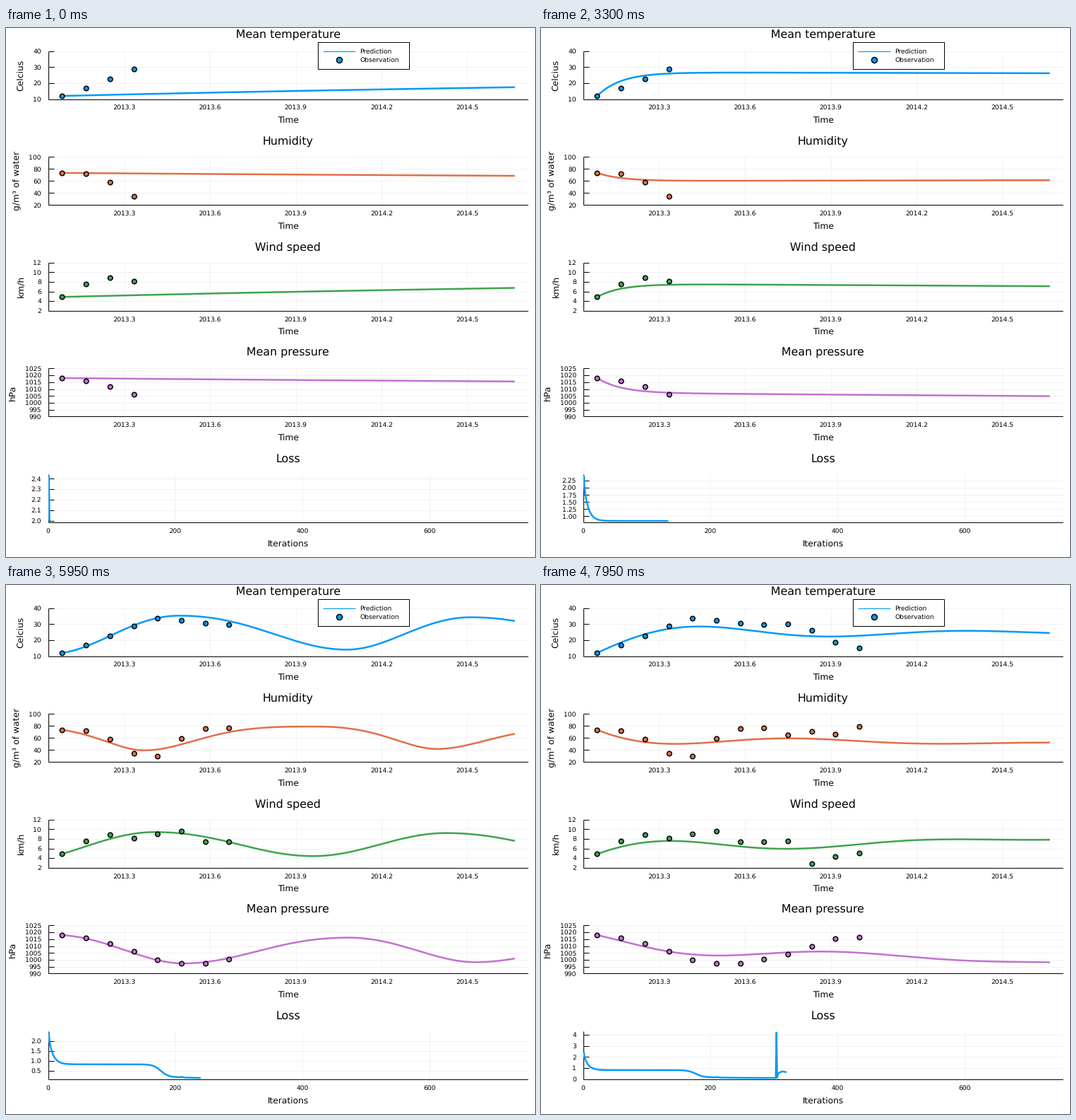
Write a matplotlib script that moves like this. It is 748x748 px and loops after 8000 ms.

```python
import numpy as np
import matplotlib.pyplot as plt
from matplotlib.animation import FuncAnimation
from matplotlib.collections import LineCollection
from matplotlib.patches import Rectangle

SIZE, DPI, FRAMES, STEP_MS = 748, 100, 160, 50
PT = 72 / DPI
LEFT, RIGHT, HEIGHT = 59.7, 738.3, 68
MID = 398.9
GRID, BLUE = "#f0f0f0", "#009afa"
T0, SPAN = 2013.0836, 1.5826
YEAR = 1.021                      # period of the fitted oscillation
STAGE2, SWING, STAGE3 = 75, 98, 151
T = np.linspace(0, SPAN, 241)

plt.rcParams["font.family"] = "DejaVu Sans"
plt.rcParams["text.hinting"] = "none"

fig = plt.figure(figsize=(SIZE / DPI, SIZE / DPI), dpi=DPI, facecolor="white")
ax = fig.add_axes([0, 0, 1, 1])
ax.set_xlim(0, SIZE)
ax.set_ylim(SIZE, 0)
ax.axis("off")


def text(x, y, s, px, ha="center", **kw):
    return ax.text(x, y, s, fontsize=px * PT, ha=ha, va="baseline", **kw)


def lines(segments, color, width, z):
    col = LineCollection(segments, colors=color, linewidths=width * PT, zorder=z)
    ax.add_collection(col)
    return col


def dots(color, px, z=7):
    return ax.plot([], [], "o", color=color, ms=px * PT, mec="black",
                   mew=1.5 * PT, zorder=z)[0]


def time_x(t):
    return 167 + (np.asarray(t) - 2013.3) * 404.4


def iter_x(n):
    return LEFT + np.asarray(n) * 0.8987


class Panel:
    def __init__(self, row, title, xlabel, xticks, xlabels):
        self.bottom = b = 100.6 + 149.6 * row
        self.top = b - HEIGHT
        text(MID, b - 85.5, title, 15.9)
        text(MID, b + 33.5, xlabel, 12.3)
        for x, s in zip(xticks, xlabels):
            text(x, b + 14.6, s, 9.1)
        lines([[(x, self.top), (x, b)] for x in xticks], GRID, 0.9, 1)
        lines([[(LEFT, self.top), (LEFT, b)], [(LEFT, b), (RIGHT, b)]], "black", 1, 5)
        self.grid = lines([], GRID, 0.9, 1)
        self.ticks = lines([], "black", 1, 5)
        self.labels = [text(49.9, 0, "", 9.1, ha="right") for _ in range(9)]

    def y(self, v, lo, hi):
        return self.bottom - (np.asarray(v, float) - lo) / (hi - lo) * HEIGHT

    def set_ticks(self, values, lo, hi, fmt):
        ys = self.y(values, lo, hi)
        self.grid.set_segments([[(LEFT, y), (RIGHT, y)] for y in ys])
        self.ticks.set_segments([[(LEFT, y), (LEFT + 8, y)] for y in ys])
        for lab in self.labels:
            lab.set_text("")
        for lab, v, y in zip(self.labels, values, ys):
            lab.set_text(fmt % v)
            lab.set_y(y + 3.2)

    def curve(self, color):
        line, = ax.plot([], [], color=color, lw=2.5 * PT, zorder=6,
                        solid_capstyle="butt", solid_joinstyle="round")
        line.set_clip_path(Rectangle((LEFT, self.top), RIGHT - LEFT, HEIGHT,
                                     transform=ax.transData))
        return line


def cycle(t, turn, part, lean_out, lean_back):
    """Skewed cosine: 1 at turn, -1 after the given part of the period."""
    u = (t - turn) / YEAR % 1
    out = u < part
    s = np.where(out, u / part, (u - part) / (1 - part))
    s = s + np.where(out, lean_out, lean_back) * s * (1 - s)
    return np.where(out, 1, -1) * np.cos(np.pi * s)


class Series:
    def __init__(self, row, title, ylabel, base, color, axis, obs, settle, orbit, damped):
        self.panel = Panel(row, title, "Time", time_x(2013.3 + 0.3 * np.arange(5)),
                           ["%.1f" % (2013.3 + 0.3 * i) for i in range(5)])
        lo, hi, step = axis
        self.range = lo, hi
        self.panel.set_ticks(np.arange(lo, hi + 1, step), lo, hi, "%d")
        text(base, self.panel.bottom - HEIGHT / 2, ylabel, 12.4,
             rotation=90, rotation_mode="anchor")
        self.start = obs[0]
        self.obs_x = time_x(T0 + np.arange(len(obs)) / 12)
        self.obs_y = self.panel.y(obs, lo, hi)
        self.settle_args, self.orbit_args, self.damped_args = settle, orbit, damped
        self.line = self.panel.curve(color)
        self.dots = dots(color, 6.6)

    def anchored(self, v):
        return v + (self.start - v[0]) * np.exp(-T / 0.15)

    def settle(self, k):
        """Relax towards a level, faster as training goes on."""
        first, last, drift = self.settle_args
        grown = 1 - np.exp(-k / 6)
        amp = first + (last - first) * grown
        rate = 0.29 + 11.7 * grown
        return self.start + amp * (1 - np.exp(-rate * T)) + drift * min(k / 66, 1) * T

    def orbit(self, k):
        mean, amp, lift, turn, *shape = self.orbit_args
        fade = np.exp(-max(k - SWING, 0) / 18)
        t = T - 0.02 * fade * np.cos(2 * np.pi * (T - turn) / YEAR)
        wave = amp * np.exp(-0.1 * T) * cycle(t, turn, *shape)
        return self.anchored(mean + lift * fade + wave)

    def damped(self):
        mean, slope, amp, turn = self.damped_args
        wave = amp * np.exp(-1.4 * T) * np.cos(2 * np.pi * (T - turn) / 0.95)
        return self.anchored(mean + slope * T + wave)

    def predict(self, k):
        swing = self.orbit(k)
        if k < SWING:
            mix = 1 / (1 + np.exp((86 - k) / 1.8)) + 0.2 * np.exp(-((k - 92) / 2.5)**2)
            flat = self.settle(k)
            return flat + mix * (swing - flat)
        if k < STAGE3:
            return swing
        if k == STAGE3:
            return swing + self.orbit_args[1] * 1.2 * T
        mix = min(1, 0.25 + (k - STAGE3 - 1) / 8)
        return swing + mix * (self.damped() - swing)

    def update(self, k):
        self.line.set_data(time_x(T0 + T), self.panel.y(self.predict(k), *self.range))
        n = 4 if k < STAGE2 else 8 if k < STAGE3 else 12
        self.dots.set_data(self.obs_x[:n], self.obs_y[:n])


# settle: first and last amplitude, drift
# orbit: mean, amplitude, lift, turn, part, leans; damped: mean, slope, amplitude, turn
series = [
    Series(0, "Mean temperature", "Celcius", 24.3, BLUE, (10, 40, 10),
           [12, 16.8, 22.8, 28.8, 33.8, 32.5, 30.6, 29.5, 29.9, 26.1, 18.8, 15.1],
           settle=(14.8, 14.8, -0.4),
           orbit=(23.85, 11.4, 1.7, 0.405, 0.585, -0.2, 0.1),
           damped=(24.6, 0, 7.5, 0.37)),
    Series(1, "Humidity", "g/m³ of water", 19, "#e36f47", (20, 100, 20),
           [73.3, 72.4, 58, 34.9, 29.2, 59.3, 75.3, 77.1, 64.7, 70.6, 66.5, 79.6],
           settle=(-13.2, -13.6, 0.95),
           orbit=(58.5, -20.8, 4.3, 0.284, 0.6, 0.7, -0.43),
           damped=(57, -3.7, -12.5, 0.25)),
    Series(2, "Wind speed", "km/h", 24.3, "#3ea44e", (2, 12, 2),
           [4.87, 7.51, 8.84, 8.1, 8.99, 9.65, 7.4, 7.4, 7.63, 2.84, 4.28, 5.01],
           settle=(5.1, 2.75, -0.33),
           orbit=(6.75, 2.68, 0.4, 0.317, 0.557, -0.12, 0),
           damped=(5.8, 1.4, 2.2, 0.255)),
    Series(3, "Mean pressure", "hPa", 13, "#c371d2", (990, 1025, 5),
           [1018, 1016.1, 1011.9, 1006.4, 1000, 997.5, 997.5, 1000.6,
            1004.2, 1010, 1015.6, 1016.2],
           settle=(-6.7, -10.8, -1.5),
           orbit=(1006.9, -10.1, 0.3, 0.42, 0.577, 0.12, -0.1),
           damped=(1010, -7.4, -7, 0.41)),
]


def loss_curve(n):
    plateau = 0.83 + 1.34 * np.exp(-0.15 * (n - 1)) + 0.26 * np.exp(-3 * (n - 1))
    floor = 0.12 + 0.06 * np.exp(-np.maximum(n - 198, 0) / 40)
    drop = 1 / (1 + np.exp((177 - n) / 6))
    loss = plateau + (floor - plateau) * drop + 0.03 * np.exp(-((n - 210) / 2)**2)
    spike = 2 * (STAGE3 + 1)
    after = n - spike - 1
    again = 0.15 + 0.51 * (1 - np.exp(-after / 1.5)) + 0.06 * np.exp(-((after - 9) / 2)**2)
    return np.where(n < spike, loss, np.where(n == spike, 4.19, again))


ITERS = np.arange(1, 2 * FRAMES + 1)
with np.errstate(over="ignore"):
    LOSS = loss_curve(ITERS)

loss_ticks = 200 * np.arange(4)
loss_panel = Panel(4, "Loss", "Iterations", iter_x(loss_ticks), map(str, loss_ticks))
loss_line = loss_panel.curve(BLUE)


def tick_step(span):
    for limit, step, fmt in ((.75, .1, "%.1f"), (1.3, .2, "%.1f"),
                             (2, .25, "%.2f"), (3, .5, "%.1f")):
        if span < limit:
            return step, fmt
    return 1, "%d"


def update_loss(k):
    n = 2 * (k + 1)
    vals = LOSS[:n]
    pad = 0.03 * np.ptp(vals)
    lo, hi = vals.min() - pad, vals.max() + pad
    step, fmt = tick_step(hi - lo)
    ticks = np.arange(np.ceil(lo / step - 0.01), np.floor(hi / step) + 1) * step
    loss_panel.set_ticks(np.abs(ticks), lo, hi, fmt)
    loss_line.set_data(iter_x(ITERS[:n]), loss_panel.y(vals, lo, hi))


def legend():
    ax.add_patch(Rectangle((441, 20), 129, 37.5, fc="white", ec="black",
                           lw=PT, zorder=8))
    lines([[(448.5, 32.8), (494, 32.8)]], BLUE, 1.1, 9)
    dots(BLUE, 8, 9).set_data([471], [45])
    text(500.3, 36, "Prediction", 9.1, ha="left", zorder=9)
    text(500.3, 48.3, "Observation", 9.1, ha="left", zorder=9)


legend()


def update(k):
    for s in series:
        s.update(k)
    update_loss(k)
    return []


anim = FuncAnimation(fig, update, frames=FRAMES, interval=STEP_MS,
                     init_func=lambda: update(0), repeat=True, repeat_delay=0)
plt.show()
```
